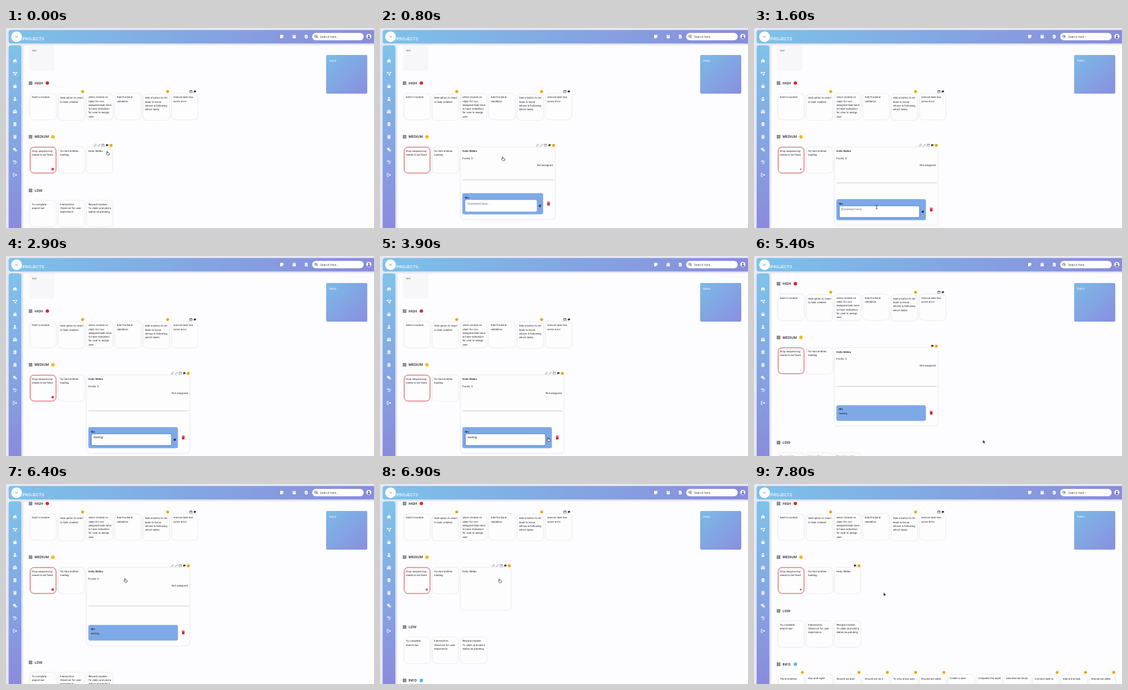
An HTML page that plays this animation: 600 px wide and 326 px high, repeating every 7900 ms.

```html
<!DOCTYPE html>
<html lang="en">
<head>
<meta charset="utf-8">
<title>Task board</title>
<style>
@property --p { syntax: '<number>'; inherits: true; initial-value: 0; }
@property --s { syntax: '<number>'; inherits: true; initial-value: 0; }
html, body { margin: 0; width: 100%; height: 100%; overflow: hidden; background: #e7e8f4; }
svg {
  display: block; width: 100vw; height: 100vh;
  font: 4.15px Inter, "Open Sans", sans-serif; text-rendering: geometricPrecision;
  animation: grow 7.9s infinite, scroll 7.9s infinite;
}
/* --p: how far the open card has grown, --s: scroll distance */
@keyframes grow {
  0%, 6.33% { --p: 0; animation-timing-function: ease; }
  12.66%, 84.81% { --p: 1; animation-timing-function: ease; }
  91.14%, 100% { --p: 0; }
}
@keyframes scroll {
  0%, 63.3% { --s: 0; animation-timing-function: ease-in-out; }
  70.9%, 100% { --s: 58; }
}
@keyframes pulse {
  0%, 100% { transform: scale(1); }
  10.13% { transform: scale(0); }
  20.25% { transform: scale(.5); }
  36.7% { transform: scale(1); }
  49% { transform: scale(.1); }
  60.76% { transform: scale(.55); }
  70% { transform: scale(.2); }
  81% { transform: scale(1); }
  98.7% { transform: scale(.6); }
}
.page { transform: translateY(calc(-1px * var(--s))); }
.below { transform: translateY(calc(84px * var(--p))); }
.grow { width: calc(42px + 126px * var(--p)); height: calc(42px + 85px * var(--p)); }
.tools { transform: translateX(calc(126px * var(--p))); }
.side { transform: translateX(calc(126px * (var(--p) - 1))); }
.foot { transform: translateY(calc(85px * (var(--p) - 1))); }
.mid { transform: translateY(calc(42.5px * (var(--p) - 1))); }
.rule { width: calc(37.5px + 126px * var(--p)); height: .6px; fill: #a9a9ad; }
.box { width: calc(20px + 126px * var(--p)); fill: #7ea9e7; }
.input { width: calc(5px + 126px * var(--p)); fill: #fefeff; }
.ring { stroke: #3f74cf; stroke-width: 1; }
.card { fill: #fefdfe; filter: drop-shadow(0 .8px 1.3px rgba(40, 40, 60, .2)); }
.alert { stroke: #e2474c; stroke-width: .9; }
.pulse { transform-box: fill-box; transform-origin: center; animation: pulse 7.9s infinite; }
.head { font-size: 5.6px; font-weight: 500; }
.bold { font-weight: 600; }
.field { font-size: 4.65px; }
.line { fill: none; stroke-linecap: round; stroke-linejoin: round; }
text { fill: #17171c; }
.white { fill: #fff; }
</style>
</head>
<body>
<script>
const LOOP = 7900;
const PITCH = 46.15;
const css = [];
const pct = t => (t / LOOP * 100).toFixed(3) + '%';

// Visible only during the given [from, to] spans, in ms
function during(...spans) {
  const name = 'show' + css.length;
  const steps = spans.map(([a, b]) => `${pct(a)}{opacity:1}${pct(b)}{opacity:0}`).join('');
  css.push(`@keyframes ${name}{0%{opacity:0}${steps}}`);
  return `style="animation:${name} ${LOOP}ms step-end infinite"`;
}

function travel(stops) {
  const steps = stops.map(([t, x, y]) => `${pct(t)}{transform:translate(${x}px,${y}px)}`).join('');
  css.push(`@keyframes travel{${steps}}`);
  return `style="animation:travel ${LOOP}ms ease-in-out infinite"`;
}

const text = (x, y, s, cls = '', more = '') => `<text x="${x}" y="${y}" class="${cls}" ${more}>${s}</text>`;
const rect = (x, y, w, h, r, fill) => `<rect x="${x}" y="${y}" width="${w}" height="${h}" rx="${r}" fill="${fill}"/>`;
const dot = (x, y, r, fill) => `<circle cx="${x}" cy="${y}" r="${r}" fill="${fill}"/>`;
const path = (d, fill) => `<path d="${d}" fill="${fill}"/>`;
const stroke = (d, color, w = .8) => `<path class="line" d="${d}" stroke="${color}" stroke-width="${w}"/>`;
const at = (x, y, body) => `<g transform="translate(${x} ${y})">${body}</g>`;
const group = (attrs, ...body) => `<g ${attrs}>${body.join('')}</g>`;

const face = (x, y) => at(x, y, dot(0, 0, 2.5, '#f6b818') + dot(-.8, -.5, .35, '#8a5a10') +
  dot(.8, -.5, .35, '#8a5a10') + stroke('M-1 .8Q0 1.5 1 .8', '#8a5a10', .4));
const chat = (x, y) => at(x, y, path('M-2.1-.2Q-2-1.8 0-1.8T2.1-.2Q2 1.3 0 1.3L-1.7 2-1.4 1Q-2.1.6-2.1-.2Z', '#34343a'));
const calendar = (x, y, color) => at(x, y,
  stroke('M-1.8-1.4H1.8V1.8H-1.8ZM-1.8-.7H1.8M-.9-2V-1.4M.9-2V-1.4', color, .55));

function heading(y, label, x, color) {
  let out = '';
  for (let i = 0; i < 9; i++) out += rect(37.3 + i % 3 * 2, y - 2.6 + (i / 3 | 0) * 2, 1.4, 1.4, .3, '#222');
  out += text(46.5, y + 2, label, 'head');
  return color ? out + dot(x, y, 2.8, color) : out;
}

function card(i, y, words, extra = {}) {
  const x = 39.5 + PITCH * i;
  const top = y + (extra.face ? 1 : 0);
  const lines = words.split('|').map((s, n) => text(x + 2.6, top + 7.4 + n * 6.25, s)).join('');
  return `<rect class="card ${extra.cls || ''}" x="${x}" y="${top}" width="42" height="42" rx="6"/>` +
    lines + (extra.face ? face(x + 39.4, y - 3.4) : '');
}

const smile = { face: true };
const high = [
  ['Add hr module'], ['Add option to react|to task created', smile],
  ['when clicked on|claim for non|assigned task have|to have indication|for user to assign|user'],
  ['Add frontend|validation'], ['Add a button to let|team to know|whose is following|which tasks', smile],
  ['remove task has|some error']
];
const low = [['To complete|search bar'], ['Intersection|Observer for user|experience'],
  ['Reward module.|To claim and add a|status as pending.']];
const info = [
  ['Think whether', smile], ['Day and night'], ['Should we add', smile], ['Should we do a', smile],
  ['To only show user', smile], ['Should we make', smile], ['Create a user'], ['Complete the audit'],
  ['add internal emoji'], ['Connect task to', smile], ['Add a link task', smile], ['Should we allow', smile]
];
const row = (list, y) => list.map(([words, extra], i) => card(i, y, words, extra)).join('');

const OPEN = 500, SENT = 4000, CLOSE = 6700, TYPE = 1900, KEY = 130;
const word = 'testing';

// Caret and text after each key press
function typing() {
  let out = '';
  for (let i = 0; i <= word.length; i++) {
    const from = i ? TYPE + (i - 1) * KEY : 1400;
    const to = i < word.length ? TYPE + i * KEY : SENT;
    out += text(142.8, 297.3, word.slice(0, i) + '<tspan dx="-.4" font-weight="300">|</tspan>', 'field', during([from, to]));
  }
  return out;
}

const trash = at(289, 296, path('M-2.6-2.7H-1L-.6-3.2H.6L1-2.7H2.6V-1.9H-2.6ZM-2.2-1.4H2.2L1.9 3H-1.9Z', '#d8242f'));
const plane = at(274.8, 299.3, path('M-2.2.3L2.2-2.2 1.4 2.1-.1 1.4-.8 2.4-1 1Z', '#14224d'));

const form = group(during([OPEN, SENT]),
  group('class="mid"', '<rect class="rule" x="134.5" y="252.2"/>'),
  group('class="foot"',
    '<rect class="box" x="134.3" y="279" height="34.3" rx="3"/>',
    text(138.6, 287.6, 'Me', 'bold'),
    '<rect class="input" x="139" y="289.8" height="19.2" rx="2"/>',
    group(during([1400, SENT]), '<rect class="input ring" x="139" y="289.8" height="19.2" rx="2"/>'),
    group(during([OPEN, TYPE]), text(142.8, 297.3, 'Comment here...', 'field', 'fill-opacity=".72"')),
    typing(),
    group('class="side"', plane, trash)));

const comment = group(during([SENT, CLOSE]),
  group('class="mid"', '<rect class="rule" x="134.5" y="256.6"/>'),
  group('class="foot"',
    '<rect class="box" x="134.3" y="287.8" height="25.5" rx="3"/>',
    text(138.6, 296, 'Me', 'bold'), text(138.6, 302.5, word),
    group('class="side"', at(0, 4, trash))));

const title = 'Hello Welbo';
const task = [
  '<rect class="card grow" x="131.5" y="194.3" rx="6"/>',
  group(during([0, OPEN], [CLOSE, LOOP]), text(134.3, 202.4, title)),
  group('clip-path="url(#inside)"',
    group(during([OPEN, CLOSE]),
      text(134.3, 202.4, title, 'bold'), text(134.3, 213.6, 'Points: 0'),
      group('class="side"', text(297.2, 225, 'Not assigned.', '', 'text-anchor="end"'))),
    form, comment),
  group('class="tools"',
    group(during([0, 4300], [6000, 6950]),
      at(145.3, 191, stroke('M-1.7-.2A1.7 1.7 0 0 1 1.3-1.1M1.5-2V-.9H.4M1.7.2A1.7 1.7 0 0 1-1.3 1.1M-1.5 2V.9H-.4', '#8b8b92', .5)),
      at(151.8, 191, stroke('M-1.8 1.8L-1.5.6 1.2-1.9 1.9-1.2-.7 1.4Z', '#77777d', .5)),
      calendar(158.3, 191, '#77777d')),
    chat(164.8, 191), face(171.2, 191.2))
].join('');

const page = group('clip-path="url(#view)"', group('class="page"',
  rect(37.5, 22, 41.5, 48, 5, '#f7f7fa'), text(42.5, 38.4, 'test', '', 'fill-opacity=".7"'),
  heading(89.7, 'HIGH', 67.4, '#d9292f'), row(high, 107),
  calendar(301.7, 103.5, '#333'), chat(308, 103.5),
  heading(177.2, 'MEDIUM', 76.5, '#f6b818'),
  card(0, 194.3, 'Drop sequencing|needs to be fixed', { cls: 'alert' }),
  group('class="pulse"', dot(76.2, 230.2, 2.1, '#cb2230'), rect(75.9, 228.9, .6, 1.5, .2, '#fff'), dot(76.2, 231.3, .35, '#fff')),
  card(1, 194.3, 'fix html entities|loading'),
  task,
  group('class="below"',
    heading(264.7, 'LOW'), row(low, 281.5),
    heading(351.7, 'INFO', 67.4, '#62aef0'), row(info, 368.5))));

const tint = '#7fb4e6';
const W = '#fff';
const side = [
  path('M-3.5 0L0-3.1 3.5 0H2.6V2.9H.8V.9H-.8V2.9H-2.6V0Z', W),
  stroke('M-2.4-1.5H2.3M-1.6-1L.6 1.6', W, .7) + dot(-2.4, -1.5, 1.2, W) + dot(2.4, -1.5, 1.2, W) + dot(.8, 1.8, 1.2, W),
  rect(-2.7, -.9, 5.4, 3.8, .8, W) + stroke('M-1.4-.8V-1.6A1.4 1.4 0 0 1 1.4-1.6V-.8', W),
  dot(0, -1.4, 1.5, W) + path('M-2.6 2.9Q-2.6.5 0 .5T2.6 2.9Z', W),
  rect(-3, -1.4, 6, 4.2, .5, W) + stroke('M0-1.4Q-2.4-2-1.4-2.8T0-1.4Q2.4-2 1.4-2.8T0-1.4', W, .6) + stroke('M0-1V2.8M-2.9.3H2.9', tint, .5),
  rect(-2.2, -2.7, 4.4, 5.7, .6, W) + rect(-1, -3.2, 2, 1, .3, W) + stroke('M-1-.8H1M-1 .4H1M-1 1.6H.4', tint, .5),
  rect(-2.2, -3, 4.4, 6, .5, W) + stroke('M-.9-1.6H-.7M.7-1.6H.9M-.9-.2H-.7M.7-.2H.9M0 1.6V2.8', tint, .8),
  dot(-1, -.8, 2.1, W) + rect(-.4, .2, 3.8, 2.7, 1.2, W) + stroke('M.2 1.4H2.6M-1.8-.8H-.4', tint, .6),
  stroke('M-2.2-1.5A2.6 2.6 0 1 1-1.9 1.8M-2.7-2.6V-1.2H-1.2M0-1.3V.2L1 .8', W),
  stroke('M-.8-2.6H-2.7V2.6H-.8M-.6 0H2.8M1.6-1.3L2.9 0 1.6 1.3', W, .9)
];

const chrome = [
  rect(4.3, 28.3, 20.8, 306, 4, 'url(#bar)'),
  side.map((s, i) => at(14.6, 53.5 + i * 20.66, s)).join(''),
  rect(4.3, 3.2, 602, 22, 4, 'url(#top)'),
  dot(17.2, 14.2, 8.7, '#fdfdff'),
  text(17.2, 15.8, 'M', '', 'text-anchor="middle" style="fill:#7f93bd;font-size:4.6px"'),
  text(25.2, 19.9, '/PROJECTS', 'white', 'font-size="6.6" font-weight="500"'),
  at(449.6, 14, path('M-2.6-2.7H2.6V1L.9 2.7H-2.6Z', W) + stroke('M.9 2.6V1H2.5', '#85a2e2', .5)),
  at(469.9, 14, rect(-2.6, -2.3, 5.2, 5.1, .6, W) + stroke('M-1.3-2.9V-2M1.3-2.9V-2', W) + stroke('M-2.6-.8H2.6', '#85a2e2', .5)),
  at(489.6, 14, path('M-2.2-2.9H.7L2.2-1.4V2.9H-2.2Z', W) + stroke('M-1 0H1M-1 1.4H1', '#879ce0', .5)),
  rect(499.2, 8, 84, 12, 6, '#fefeff'),
  at(505.6, 13.7, stroke('M1.1 1.1L2.4 2.4M1.5-.3A1.8 1.8 0 1 1-2.1-.3A1.8 1.8 0 1 1 1.5-.3', '#26262c', .7)),
  text(512, 15.7, 'Search here...', 'field', 'fill-opacity=".85"'),
  at(591.6, 13.8, dot(0, 0, 4.1, '#fff') + dot(0, -1.1, 1.3, '#4a4d86') + path('M-2.5 2.2Q-2 .7 0 .7T2.5 2.2Q0 4.2-2.5 2.2Z', '#4a4d86')),
  rect(522, 44, 67, 63, 2, 'url(#note)'),
  text(526.8, 54.8, 'Hello', 'white', 'font-size="4.9"')
].join('');

const cursor = group(travel([
  [0, 166, 204], [480, 166, 204], [760, 201, 213], [900, 201, 213], [1350, 200, 292], [3250, 200, 292],
  [3650, 275, 299], [4150, 275, 299], [4650, 374.5, 303], [5600, 374.5, 303],
  [6200, 195, 157], [6850, 195, 157], [7250, 212.5, 180], [LOOP, 212.5, 180]]),
  group(during([0, 1300], [3500, 4300], [6000, 6950]),
    '<path d="M-1.8-2.7Q-1.2-3.5-.6-2.7V-.7L1.6-.3Q2.7 0 2.6 1L2.1 3.1H-1L-2.7.9Q-2.6 0-1.8.4Z" fill="#fff" stroke="#222" stroke-width=".7" stroke-linejoin="round"/>'),
  group(during([1300, 1900], [3250, 3500]),
    stroke('M-1-2.8Q0-2.8 0-2.1Q0-2.8 1-2.8M0-2.1V2.1M-1 2.8Q0 2.8 0 2.1Q0 2.8 1 2.8', '#222', .7)),
  group(during([4300, 6000], [6950, LOOP]),
    '<path d="M-1.2-3.2V2.4L.1 1.2 1 3.3 1.9 2.9 1 .9H2.8Z" fill="#000" stroke="#fff" stroke-width=".4"/>'));

const fade = (id, x2, y2, a, b) => `<linearGradient id="${id}" x1="0" y1="0" x2="${x2}" y2="${y2}">` +
  `<stop stop-color="${a}"/><stop offset="1" stop-color="${b}"/></linearGradient>`;

document.body.innerHTML = `<svg viewBox="0 0 600 326" preserveAspectRatio="none">
<defs>
${fade('top', 1, 0, '#7cc2e9', '#8a8bdc')}${fade('bar', 0, 1, '#7ec3ea', '#8a89dc')}${fade('note', 1, 1, '#7bbbe6', '#8a8ee0')}
<clipPath id="view"><rect x="28.3" y="28" width="580" height="310" rx="4"/></clipPath>
<clipPath id="inside"><rect class="grow" x="131.5" y="194.3" rx="6"/></clipPath>
</defs>
${rect(28.3, 28, 580, 310, 4, '#fdfcfe')}${page}${chrome}${cursor}
</svg>`;
const sheet = document.createElement('style');
sheet.textContent = css.join('\n');
document.head.append(sheet);
</script>
</body>
</html>
```
